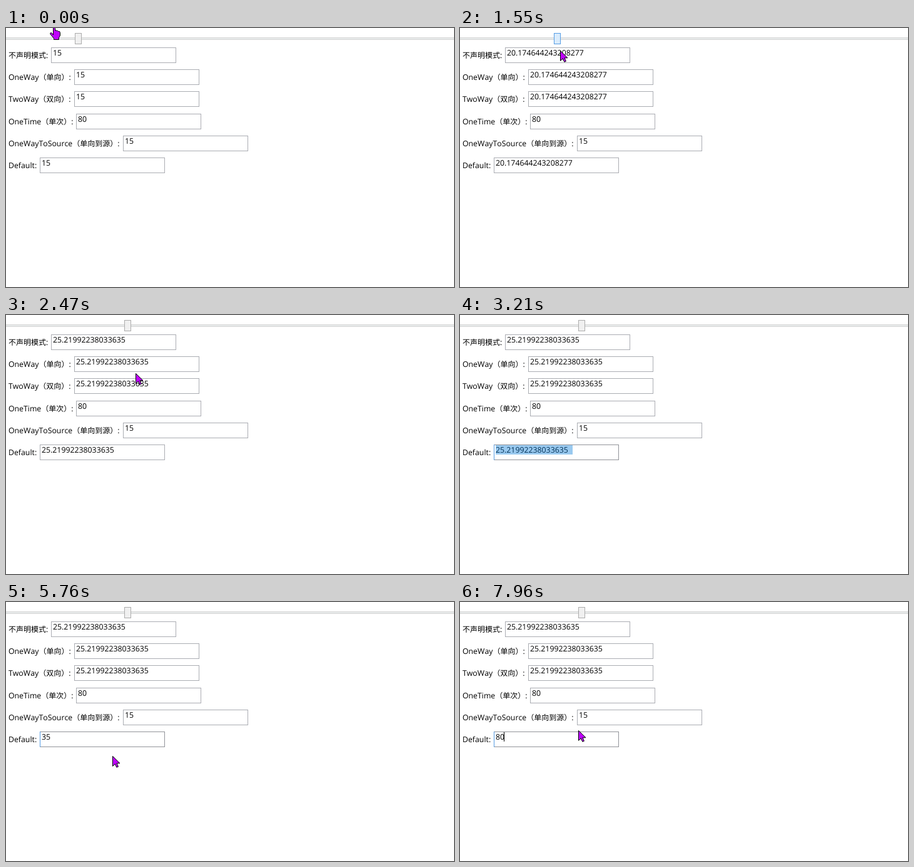
An HTML page that plays this animation: 716x414 px, repeating every 8000 ms.

```html
<!DOCTYPE html>
<html lang="zh-CN">
<head>
<meta charset="utf-8">
<title>Binding modes</title>
<style>
html, body { margin: 0; width: 716px; height: 414px; overflow: hidden; background: #fff; }
svg { display: block; }
text {
  font: 12.3px "Open Sans", "Noto Sans", "Noto Sans CJK SC", sans-serif;
  font-kerning: none;
  text-rendering: geometricPrecision;
  text-spacing-trim: space-all;
}
.cjk { font: 12px "Noto Sans CJK SC", "Noto Sans CJK", sans-serif; }
</style>
</head>
<body>
<svg id="stage" width="716" height="414" viewBox="0 0 716 414"></svg>
<script>
const LOOP = 8000;
const stage = document.getElementById('stage');

function add(tag, attrs = {}, parent = stage) {
  const node = document.createElementNS('http://www.w3.org/2000/svg', tag);
  for (const key in attrs) node.setAttribute(key, attrs[key]);
  parent.append(node);
  return node;
}

function set(node, attrs) {
  for (const key in attrs) node.setAttribute(key, attrs[key]);
}

const show = (node, on) => node.setAttribute('visibility', on ? 'visible' : 'hidden');

// Last row of a step table that has started at time t
const at = (table, t) => table.findLast(row => row[0] <= t) || table[0];

// --- Slider ---
add('rect', { x: -5.5, y: 15.5, width: 784, height: 3, fill: '#e7eaea', stroke: '#d6d6d6' });
const thumb = add('rect', { y: 8.5, width: 10, height: 17 });
const THUMB = {
  idle: { fill: '#f0f0f0', stroke: '#acacac' },
  hover: { fill: '#dcecfc', stroke: '#7eb4ea' },
  drag: { fill: '#daecfc', stroke: '#569de5' }
};

// --- Rows: Latin label, CJK label, box x, box y, fixed value ---
const fields = [
  ['', '不声明模式', 72, 31],
  ['OneWay', '（单向）', 109, 66],
  ['TwoWay', '（双向）', 109, 101],
  ['OneTime', '（单次）', 112, 137, '80'],
  ['OneWayToSource', '（单向到源）', 187, 172, '15'],
  ['Default', '', 54, 207]
].map(([latin, cjk, x, y, fixed]) => {
  const label = add('text', { x: 4, y: y + 17 });
  label.append(latin);
  if (cjk) add('tspan', { class: 'cjk' }, label).textContent = cjk;
  label.append(':');
  const box = add('rect', { x: x + .5, y: y + .5, width: 199, height: 24, fill: '#fff', stroke: '#abadb3' });
  const value = add('text', { x: x + 3, y: y + 13 });
  return { box, value, fixed };
});

const focusEdge = add('rect', { x: 54, y: 207, width: 1, height: 25, fill: '#569de5' });
const selection = add('rect', { y: 208, height: 15, fill: '#0078d7', 'fill-opacity': .4 });
const caret = add('rect', { x: 70, y: 208, width: 1, height: 15 });

// --- Cursors ---
const PURPLE = '#bf00ff';
const outline = { fill: PURPLE, stroke: '#000', 'stroke-linejoin': 'round' };
const cursors = { arrow: add('g'), hand: add('g'), beam: add('g') };
add('path', { ...outline, d: 'M.5 .5V16.5L4.3 12.9L6.8 18.3L9.4 17.2L7 11.8H12Z' }, cursors.arrow);
add('path', {
  ...outline,
  d: 'M5.5 14V2Q5.5 .5 7 .5T8.5 2V7Q10 5.8 11 7.5Q12.8 6.6 13.6 8.4Q16.5 8 16.5 10.5' +
     'V15L14.5 18.5V21.5H6.5V19.5L1 13Q0 10.6 2.4 10.4Z'
}, cursors.hand);
add('path', { d: 'M-5.5 -9h11v3h-11zM-5.5 6h11v3h-11z', fill: '#1c0624' }, cursors.beam);
add('path', { d: 'M-1.5 -7h3v14h-3z', fill: '#9b12c9' }, cursors.beam);

// --- Step tables, time first ---
const dragSteps = [
  [0, 0], [920, 20], [1010, 50], [1100, 75], [1190, 85],
  [1370, 79], [1460, 62], [1550, 40], [1640, 22], [1730, 12],
  [1930, 15], [2020, 21], [2110, 30], [2200, 50], [2290, 70], [2380, 79]
];
const thumbSteps = [[0, 'idle'], [290, 'hover'], [560, 'drag'], [2470, 'idle']];
const hoverSteps = [[0, -1], [2560, 4], [2650, 5], [2740, -1]];
const caretSteps = [
  [0, 0], [4020, 0], [4200, 1], [4760, 0], [5300, 1],
  [5760, 0], [6300, 1], [6590, 0], [7400, 1]
];
const typedSteps = [[0, null], [4020, '3'], [4200, '35'], [7310, '8'], [7400, '80']];

const path = [
  [0, 'hand', 70, -3], [90, 'arrow', 92, 3], [190, 'arrow', 110, 10], [290, 'arrow', 121, 13],
  [560, 'arrow', 122, 15], [650, 'arrow', 122, 16], [740, 'arrow', 123, 17],
  [920, 'arrow', 143, 18], [1010, 'arrow', 173, 20], [1100, 'arrow', 197, 23], [1190, 'arrow', 207, 25],
  [1370, 'arrow', 200, 27], [1460, 'arrow', 182, 31], [1550, 'arrow', 160, 36],
  [1640, 'arrow', 142, 40], [1730, 'arrow', 134, 42],
  [1930, 'arrow', 138, 45], [2020, 'arrow', 148, 48], [2110, 'arrow', 161, 50],
  [2200, 'arrow', 181, 54], [2290, 'arrow', 198, 60], [2380, 'arrow', 204, 74],
  [2470, 'arrow', 207, 93], [2560, 'beam', 208, 182], [2650, 'beam', 200, 224],
  [2740, 'beam', 184, 225], [2830, 'beam', 160, 225], [2920, 'beam', 118, 226],
  [3020, 'beam', 70, 227], [3110, 'beam', 18, 228], [3210, 'none', 0, 0],
  [4200, 'arrow', 22, 212], [4290, 'arrow', 38, 212], [4380, 'beam', 66, 219],
  [4470, 'beam', 92, 220], [4560, 'beam', 104, 221],
  [4850, 'beam', 112, 223], [4940, 'beam', 125, 228], [5030, 'arrow', 140, 233],
  [5120, 'arrow', 152, 236], [5210, 'arrow', 162, 237], [5300, 'arrow', 168, 238], [5400, 'arrow', 170, 238],
  [5760, 'arrow', 170, 246], [5850, 'arrow', 170, 256], [5940, 'arrow', 168, 254],
  [6030, 'arrow', 165, 247], [6120, 'arrow', 160, 240], [6210, 'arrow', 155, 233],
  [6300, 'beam', 150, 225], [6400, 'beam', 147, 221], [6500, 'beam', 145, 219],
  [6590, 'beam', 95, 223], [6680, 'beam', 41, 228],
  [7310, 'arrow', 16, 232], [7400, 'arrow', 24, 255], [7490, 'arrow', 60, 271],
  [7580, 'arrow', 105, 268], [7670, 'arrow', 140, 252], [7770, 'arrow', 165, 234],
  [7860, 'beam', 182, 215], [7960, 'arrow', 189, 205]
];

// Selected span of the last field as [left, right]
function selected(t, cursorX) {
  if (t >= 2830 && t < 4020) return [Math.max(57, Math.min(180, cursorX)), 180];
  if (t >= 6680 && t < 7310) return [57, 70.5];
  return [57, 57];
}

function draw(t) {
  const drag = at(dragSteps, t)[1];
  const number = String(15 + drag * 100 / 773);
  const hovered = at(hoverSteps, t)[1];
  const typed = at(typedSteps, t)[1];
  const focused = t >= 2740;

  set(thumb, { x: 110.5 + drag, ...THUMB[at(thumbSteps, t)[1]] });

  fields.forEach(({ box, value, fixed }, i) => {
    const last = i === 5;
    value.textContent = fixed || (last && typed) || number;
    box.setAttribute('stroke', last && focused ? '#929499' : i === hovered ? '#7eb4ea' : '#abadb3');
  });

  const [, kind, x, y] = at(path, t);
  const [left, right] = selected(t, x);
  set(selection, { x: left, width: right - left });
  show(focusEdge, focused);
  show(caret, at(caretSteps, t)[1]);

  for (const name in cursors) show(cursors[name], name === kind);
  if (cursors[kind]) cursors[kind].setAttribute('transform', `translate(${x} ${y})`);
}

const start = performance.now();
function tick() {
  draw((performance.now() - start) % LOOP);
  requestAnimationFrame(tick);
}
tick();
</script>
</body>
</html>
```
